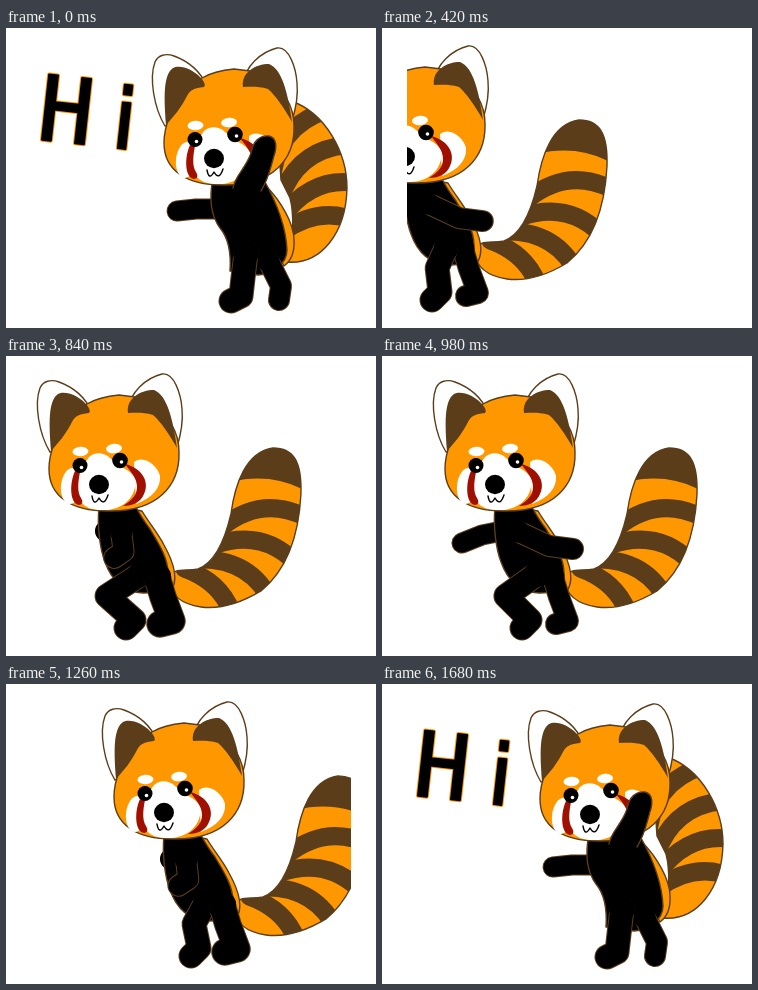
Animation, 370 px wide and 300 px high, one loop 1.96 s. Source, as an HTML page with a canvas:

```html
<!DOCTYPE html>
<html lang="en">
<head>
<meta charset="utf-8">
<title>Red panda says hi</title>
<style>
html, body { margin: 0; width: 100%; height: 100%; overflow: hidden; background: #fff; }
canvas { display: block; }
</style>
</head>
<body>
<canvas id="stage" width="370" height="300"></canvas>
<script>
const c = document.getElementById('stage').getContext('2d');
const ORANGE = '#ff9800', BROWN = '#5c3d1a', RED = '#a01000';
const STEP = 140, LOOP = 1960;
// Distance still to walk at each step
const toGo = [215, 200, 185, 163, 128, 115, 95, 73, 50, 21, 4];
c.lineCap = c.lineJoin = 'round';

function shape(path, fill, line) {
  const p = typeof path === 'string' ? new Path2D(path) : path;
  if (fill) { c.fillStyle = fill; c.fill(p); }
  if (line) { c.strokeStyle = line; c.lineWidth = 1.4; c.stroke(p); }
}

function oval(x, y, rx, ry, fill, turn = 0) {
  c.beginPath();
  c.ellipse(x, y, rx, ry, turn, 0, 7);
  c.fillStyle = fill;
  c.fill();
}

function at(x, y, draw) {
  c.save();
  c.translate(x, y);
  draw();
  c.restore();
}

// Thick outlined limb from joint (x, y); the other joints are relative to it
function limb(x, y, w, ...joints) {
  at(x, y, () => {
    c.beginPath();
    c.moveTo(0, 0);
    joints.forEach(j => c.lineTo(...j));
    c.strokeStyle = BROWN; c.lineWidth = w + 2; c.stroke();
    c.strokeStyle = '#000'; c.lineWidth = w; c.stroke();
    oval(0, 0, w / 2 + 1.5, w / 2 + 1.5, '#000');
  });
}

// Tail whose four stripes fan out around a pivot
function tail(outline, tip, x, y, first, step) {
  const p = new Path2D(outline);
  shape(p, ORANGE);
  c.save();
  c.clip(p);
  shape(tip, BROWN);
  c.translate(x, y);
  c.rotate(first);
  c.strokeStyle = BROWN;
  c.lineWidth = 18;
  for (let i = 0; i < 4; i++) {
    c.stroke(new Path2D('M56 13Q100 -22 148 8'));
    c.rotate(step);
  }
  c.restore();
  shape(p, null, BROWN);
}

function walkTail(turn) {
  at(195, 225, () => {
    c.rotate(turn);
    c.translate(-70, -230);
    tail('M62 226C68 212 78 218 92 215C108 209 118 190 125 160C129 130 140 98 167 94C188 94 196 108 195 140C193 180 182 215 155 237C130 252 110 255 95 253C75 250 64 240 62 226Z',
      'M125 128Q165 118 200 137V85H125Z', 60, 160, 0, .34);
  });
}

function head(dx, dy) {
  at(dx, dy, () => {
    // ears
    shape('M159 98C148 80 143 50 149 34C152 27 160 25 168 28C182 33 196 44 200 58L190 85Z', '#fff', BROWN);
    shape('M237 56C239 38 255 24 271 20C283 18 290 40 291 55C292 65 290 80 286 93L250 90Z', '#fff', BROWN);
    shape('M158 115C158 98 166 78 178 63L196 50C206 44 217 42 228 41L244 43L262 53C278 62 288 78 288 98C289 132 266 157 220 157C180 158 158 142 158 115Z', ORANGE, BROWN);
    shape('M160 97C158 70 157 47 167 40C174 36 188 42 194 49C198 53 200 57 198 59C188 60 184 62 181 68C175 80 168 88 160 97Z', BROWN);
    shape('M237 59C235 44 250 36 263 36C276 41 282 65 286 94C278 80 270 68 262 61C252 58 244 59 237 59Z', BROWN);
    // cheeks, muzzle and tear marks
    oval(180, 132, 10, 18, '#fff', .1);
    shape('M243 108C253 100 267 112 269 122C270 134 261 144 245 150Z', '#fff');
    shape('M196 106C200 98 212 97 219 104C228 113 240 116 244 124C247 142 232 157 211 156C196 156 187 150 186 135C186 120 190 112 196 106Z', '#fff');
    shape('M184 117C178 130 179 150 188 151C192 151 192 147 190 144C186 138 187 128 189 118Z', RED);
    shape('M234 110C251 114 259 128 253 140C250 148 242 152 232 152C241 146 246 141 246 133C246 124 240 118 234 110Z', RED);
    // brows, eyes, nose, mouth
    oval(189.5, 97.5, 8, 4.7, '#fff', -.05);
    oval(223, 94.5, 8, 4.7, '#fff', -.1);
    oval(189, 111.5, 7.5, 7.5, '#000');
    oval(229, 106.5, 7.8, 7.8, '#000');
    oval(190.5, 113.5, 1.8, 1.8, '#fff');
    oval(230.5, 108, 1.8, 1.8, '#fff');
    oval(208, 130.5, 10, 9.7, '#000');
    shape('M201 142Q203 153 208 144Q213 153 217 141', null, '#000');
  });
}

function walk(k) {
  const beat = Math.cos((k - 2) * 1.143);
  const swing = Math.max(-1, Math.min(1, 2.4 * beat));   // near arm: 1 back, -1 forward
  const lift = Math.max(0, -beat) ** 3;
  const sag = 1 - swing * swing;
  const knee = -20 + 14 * Math.cos((k - 2) * .76);
  const x = -toGo[k - 1];
  const legs = [
    () => limb(176, 218, 24 - 4 * swing, [6, 20], [15, 44], [3, 47]),
    () => limb(160, 215, 23, [knee, 22], [-7, 46], [-15, 54])
  ];
  if (swing < 0) legs.reverse();

  c.save();
  c.beginPath();
  c.rect(25, 0, 320, 300);
  c.clip();
  at(x + 90, 3, () => {
    walkTail(-.26 * lift);
    limb(125, 172, 19, [19 - 39 * swing, 4], [20 - 60 * swing, 12]);
    shape('M150 150L161 152C168 164 177 174 183 186C192 202 198 220 190 232L178 225Z', ORANGE, BROWN);
    shape('M118 148C116 168 119 190 124 203C130 220 142 233 162 234C176 234 187 230 187 214C187 198 176 182 169 170Q160 158 155 148Z', '#000', BROWN);
    legs.forEach(draw => draw());
    limb(140, 172, 20, [10 + 22 * swing, 15 + 6 * sag], [9 + 47 * swing, 18 + 10 * sag]);
  });
  head(x, 4 * lift - 2);
  c.restore();
}

function letter(s, x, font) {
  c.font = font;
  c.strokeStyle = ORANGE; c.lineWidth = 4; c.strokeText(s, x, 0);
  c.strokeStyle = '#000'; c.lineWidth = 2; c.strokeText(s, x, 0);
  c.fillStyle = '#000'; c.fillText(s, x, 0);
}

function greeting() {
  at(57, 114, () => {
    c.rotate(.11);
    c.textAlign = 'center';
    letter('H', 0, '90px "DejaVu Sans Mono", monospace');
    letter('i', 59, '84px "DejaVu Sans", sans-serif');
  });
}

function wave() {
  greeting();
  tail('M281 234C288 212 288 185 284 170L275 152L270 80L285 73C320 85 341 125 341 160C340 205 315 237 281 234Z',
    '', 220, 190, -.87, .3);
  shape('M260 158C274 172 288 195 288 212Q289 230 278 238L258 200Z', ORANGE, BROWN);
  limb(215, 181, 19, [-25, 0], [-44, 2]);
  shape('M207 150C203 170 205 188 214 200C224 212 225 228 224 243L252 247C266 246 281 236 281 222C280 196 268 170 258 152Z', '#000', BROWN);
  limb(262, 232, 20, [7, 14], [13, 26], [11, 40]);
  limb(240, 225, 23, [-3, 25], [-5, 43], [-15, 48]);
  head(0, 0);
  const arm = 'M227 160C229 148 240 140 245 125C247 113 254 107 263 108C271 110 271 119 268 128C264 142 262 152 255 163';
  shape(arm, '#000', BROWN);
}

function frame() {
  const k = Math.floor((performance.now() - start) % LOOP / STEP);
  c.clearRect(0, 0, 370, 300);
  if (k < 1 || k > toGo.length) wave();
  else walk(k);
  requestAnimationFrame(frame);
}
const start = performance.now();
frame();
</script>
</body>
</html>
```
